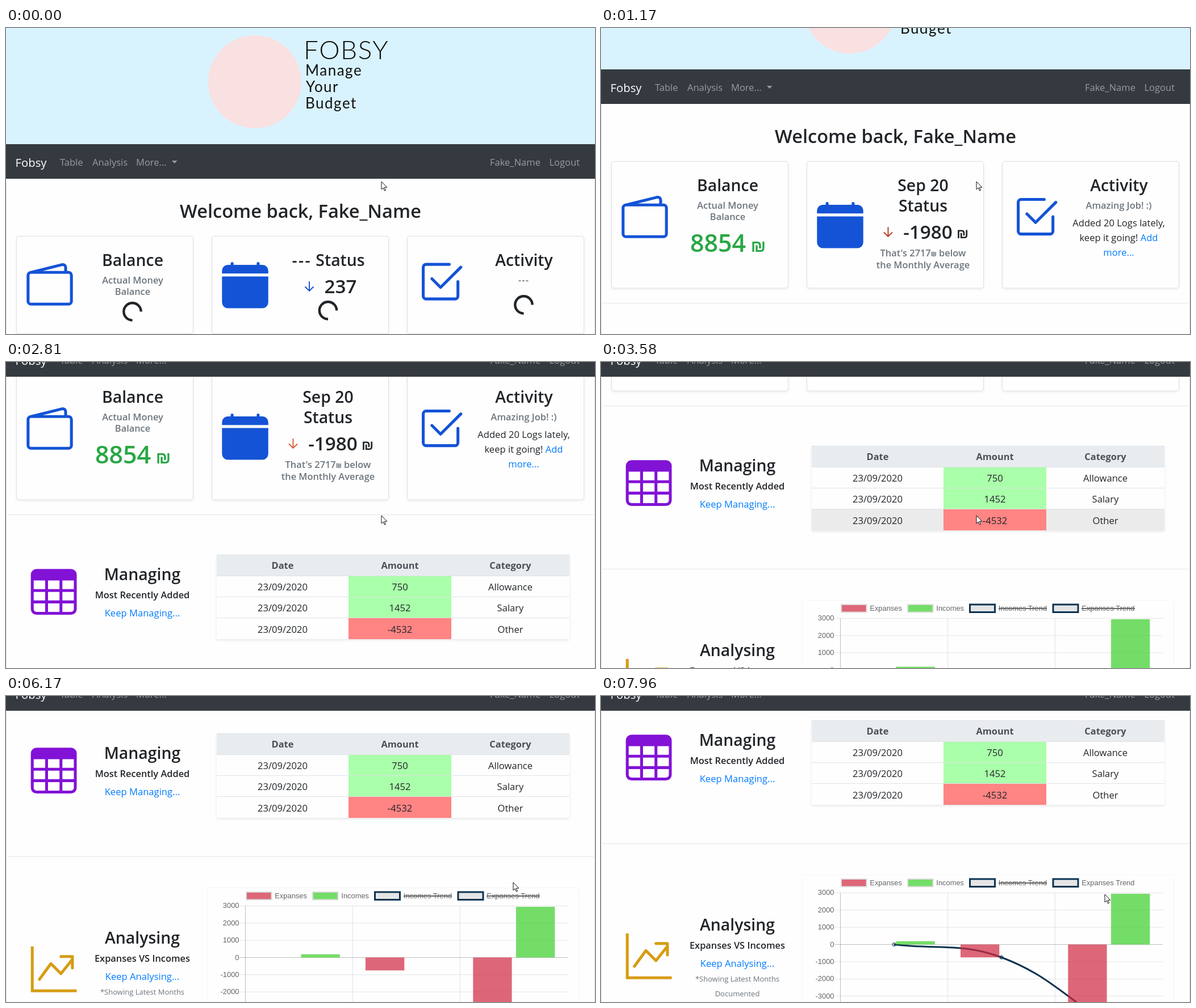
An HTML page for the animation above (8 s loop, 1037x540 px).

```html
<!DOCTYPE html>
<html lang="en">
<head>
<meta charset="utf-8">
<title>Budget dashboard</title>
<style>
html, body { margin: 0; height: 100%; overflow: hidden; background: #fefefe }
svg { display: block; width: 100%; height: 100%; font: 16.6px "Open Sans", "Noto Sans", "DejaVu Sans", sans-serif; fill: #212529 }
.mid { text-anchor: middle }
.h1 { font-size: 32.6px; font-weight: 600 }
.h2 { font-size: 28.4px; font-weight: 600 }
.sub { font-size: 16.4px; font-weight: 600 }
.th { font-size: 16.4px; font-weight: 700; fill: #495057 }
.muted { fill: #6c757d }
.small { font-size: 13px }
.num { font-size: 33.3px; font-weight: 600 }
.money { font-size: 43px; font-weight: 600; fill: #28a745 }
.coin { font: bold 24px "Liberation Sans", "DejaVu Sans", sans-serif }
.link { fill: #007bff }
.blue { fill: #1453d6 }
.brand { font: 400 26px Lato, "Open Sans", sans-serif; letter-spacing: 1.5px; fill: #111 }
.card { fill: #fefefe; stroke: #dfdfdf; filter: drop-shadow(0 2px 2px rgba(0,0,0,.06)) }
.hr { stroke: #e5e5e5 }
.nav text { fill: #9a9da0; font-size: 16.5px }
.chart text { font: 12.9px "Liberation Sans", Arial, sans-serif; fill: #666 }
.spin { fill: none; stroke: #212529; stroke-width: 4.4 }
</style>
</head>
<body>
<svg viewBox="0 0 1037 540">
  <g id="page">
    <path d="M.5 265V1400M1036.5 265V1400" stroke="#dee2e6"/>
    <rect width="1037" height="205" fill="#d9f3fe"/>
    <circle cx="438" cy="95" r="82" fill="#f9e0e1"/>
    <g class="brand">
      <text x="524" y="55" style="font-size:46px;font-weight:300">FOBSY</text>
      <text x="527" y="84">Manage</text>
      <text x="528" y="113">Your</text>
      <text x="527" y="142">Budget</text>
    </g>
    <text class="h1 mid" x="518.5" y="335">Welcome back, Fake_Name</text>
    <g id="cards"></g>

    <path id="wallet" class="blue" d="M12.136.326A1.5 1.5 0 0 1 14 1.78V3h.5A1.5 1.5 0 0 1 16 4.5v9a1.5 1.5 0 0 1-1.5 1.5h-13A1.5 1.5 0 0 1 0 13.5v-9a1.5 1.5 0 0 1 1.432-1.499zM5.562 3H13V1.78a.5.5 0 0 0-.621-.484zM1.5 4a.5.5 0 0 0-.5.5v9a.5.5 0 0 0 .5.5h13a.5.5 0 0 0 .5-.5v-9a.5.5 0 0 0-.5-.5z" fill-rule="evenodd"/>
    <path id="calendar" class="blue" d="M3.5 0a.5.5 0 0 1 .5.5V1h8V.5a.5.5 0 0 1 1 0V1h1a2 2 0 0 1 2 2v1H0V3a2 2 0 0 1 2-2h1V.5a.5.5 0 0 1 .5-.5zM0 5h16v9a2 2 0 0 1-2 2H2a2 2 0 0 1-2-2z"/>
    <path id="check" d="M11 2H3a1 1 0 0 0-1 1v10a1 1 0 0 0 1 1h10a1 1 0 0 0 1-1V8M5 7l3 3 7-7" fill="none" stroke="#1453d6" stroke-linecap="round" stroke-linejoin="round"/>

    <g class="mid">
      <text class="h2" x="223" y="420">Balance</text>
      <text class="h2" x="912" y="420">Activity</text>
      <text class="sub muted" x="223" y="450.5">Actual Money</text>
      <text class="sub muted" x="223" y="471">Balance</text>
      <text id="amount" class="num"></text>
      <g id="loading">
        <text class="h2" x="567.5" y="420"><tspan letter-spacing="2.4">---</tspan> Status</text>
        <text class="sub muted" x="911.5" y="450.5" letter-spacing="1">---</text>
        <g id="spinners"></g>
      </g>
      <g id="loaded">
        <text class="money" x="206" y="527">8854</text>
        <text class="coin" x="277" y="527" style="font-size:30px;fill:#28a745">₪</text>
        <text class="h2" x="567" y="420">Sep 20</text>
        <text class="h2" x="567" y="456">Status</text>
        <text class="coin" x="636.5" y="503">₪</text>
        <text class="sub muted" x="567" y="535">That's 2717<tspan font-size="11">₪</tspan> below</text>
        <text class="sub muted" x="567" y="556">the Monthly Average</text>
        <text class="sub muted" x="911.5" y="450.5">Amazing Job! :)</text>
        <text x="911.5" y="482">Added 20 Logs lately,</text>
        <text x="911.5" y="508">keep it going! <tspan class="link">Add</tspan></text>
        <text class="link" x="911.5" y="534">more...</text>
      </g>
    </g>
    <path id="arrow" d="M0-8V8M-7 1 0 8 7 1" fill="none" stroke-width="1.9" stroke-linecap="round"/>

    <path class="hr" d="M2 617.5H1035M2 905.5H1035"/>
    <path transform="translate(43.7 713.3)scale(5.05)" fill="#8212d6" fill-rule="evenodd" d="M0 2a2 2 0 0 1 2-2h12a2 2 0 0 1 2 2v12a2 2 0 0 1-2 2H2a2 2 0 0 1-2-2zM1 4h4v3H1zM6 4h4v3H6zM11 4h4v3h-4zM1 8h4v3H1zM6 8h4v3H6zM11 8h4v3h-4zM1 12h4v3H2a1 1 0 0 1-1-1zM6 12h4v3H6zM11 12h4v2a1 1 0 0 1-1 1h-3z"/>
    <g class="mid">
      <text class="h2" x="240" y="733">Managing</text>
      <text class="sub" x="240" y="765">Most Recently Added</text>
      <text class="link" x="240" y="797">Keep Managing...</text>
      <g id="table"></g>
      <text class="h2" x="240" y="1059">Analysing</text>
      <text class="sub" x="240" y="1091">Expanses VS Incomes</text>
      <text class="link" x="240" y="1123">Keep Analysing...</text>
      <text class="muted small" x="240" y="1149">*Showing Latest Months</text>
      <text class="muted small" x="240" y="1175">Documented</text>
    </g>
    <g transform="translate(43.7 1064)scale(5.05)" fill="none" stroke="#d69c13">
      <path d="M.5 0V15.5H16"/>
      <path d="M3 11.5 7 6l3.5 3.5 4-5M10.5 3.5h4v4" stroke-linecap="round" stroke-linejoin="round"/>
    </g>
    <path d="M354.5 1400V960.5H1008.5V1400" fill="none" stroke="#f6f6f6"/>
    <g id="chart" class="chart"></g>
  </g>

  <g id="nav" class="nav">
    <rect y="205" width="1037" height="61" fill="#343a40"/>
    <text x="16.5" y="245" style="font-size:20.3px;fill:#fff">Fobsy</text>
    <text x="95" y="242.7">Table</text>
    <text x="152" y="242.7">Analysis</text>
    <text x="229" y="242.7">More...</text>
    <path d="M292 234h9.6l-4.8 5z" fill="#9a9da0"/>
    <text x="852" y="242.7">Fake_Name</text>
    <text x="956.5" y="242.7">Logout</text>
  </g>
  <circle id="click" cx="891" cy="331" r="13" fill="#ff0" opacity=".45"/>
  <path id="cursor" d="M0 0v14l3.2-3 2.3 5.2 2-.9-2.3-5.1h4.6z" fill="#fff" stroke="#111"/>
</svg>
<script>
const LOOP = 8000, ROW_TOP = 725.5, ROW_H = 37.2, ZERO = 1083.5, UNIT = 30.35 / 1000;
const $ = id => document.getElementById(id);
const set = (id, attrs) => { for (const k in attrs) $(id).setAttribute(k, attrs[k]); };
const show = (id, on) => set(id, { display: on ? 'inline' : 'none' });
const text = (x, y, str, cls = '') => `<text x="${x}" y="${y}" class="${cls}">${str}</text>`;
const rect = (x, y, w, h, fill, more = '') => `<rect x="${x}" y="${y}" width="${w}" height="${h}" fill="${fill}" ${more}/>`;
const valueY = v => ZERO - v * UNIT;

$('cards').innerHTML = [0, 1, 2].map(i =>
  `<rect class="card" x="${18.5 + i * 344}" y="367.5" width="311" height="172" rx="4"/>`).join('');
$('spinners').innerHTML = [[222.5, 500.5], [567, 498.5], [911.5, 488.5]].map(([x, y]) =>
  `<path class="spin" transform="translate(${x} ${y})" d="M15.2 0A15.2 15.2 0 1 0 0 15.2"/>`).join('');

function buildTable() {
  const cols = [487, 693.5, 888];
  const rows = [['750', 'Allowance'], ['1452', 'Salary'], ['-4532', 'Other']];
  let out = rect(371, 688, 621, 149, '#fefefe', 'style="filter:drop-shadow(0 2px 2px rgba(0,0,0,.09))"')
    + rect(371, 688, 621, 37.5, '#e9ecef')
    + rect(371, 0, 621, ROW_H, '#ebebeb', 'id="hover"');
  ['Date', 'Amount', 'Category'].forEach((s, i) => out += text(cols[i], 713, s, 'th'));
  rows.forEach(([amount, kind], i) => {
    const y = ROW_TOP + i * ROW_H;
    out += rect(603, y, 181, ROW_H, amount < 0 ? '#ff8484' : '#aaffaa')
      + `<path d="M371 ${Math.floor(y) + .5}H992" stroke="#dee2e6"/>`
      + ['23/09/2020', amount, kind].map((s, c) => text(cols[c], y + 25.6, s)).join('');
  });
  $('table').innerHTML = out + '<path d="M371 688.5H992" stroke="#dee2e6"/>';
}

function buildChart() {
  const red = 'rgba(208,41,64,.7)', green = 'rgba(59,208,42,.7)', navy = '#0c3350';
  let out = '';
  for (let v = 3000; v >= -4000; v -= 1000) {
    const y = valueY(v);
    out += `<path d="M411 ${y}H989" stroke="#000" stroke-opacity="${v ? .1 : .25}"/>`
      + `<text x="410.5" y="${y + 4}" text-anchor="end">${v}</text>`;
  }
  for (let i = 0; i < 3; i++)
    out += `<path d="M${421.5 + i * 189} ${valueY(3000)}V1300" stroke="#000" stroke-opacity="${i ? .1 : .25}"/>`;
  out += `<g id="trend" fill="none" stroke="${navy}"><path id="curve" stroke-width="3"/>`
    + [0, 1, 2].map(i => `<circle id="dot${i}" r="3" fill="rgba(0,0,0,.1)"/>`).join('') + '</g>';
  const bar = (x, v, fill) => rect(x, Math.min(ZERO, valueY(v)), 68.3, Math.abs(v) * UNIT, fill);
  out += bar(519.5, 190, green) + bar(633, -750, red) + bar(822.3, -4650, red) + bar(898, 2950, green);
  const legend = [['Expanses', 423, red], ['Incomes', 540, green], ['Incomes Trend', 649.5], ['Expanses Trend', 796]];
  for (const [name, x, fill] of legend) {
    out += fill ? rect(x, 968, 44.5, 13.5, fill, 'stroke="#ddd" stroke-width="2"')
      : rect(x, 968, 44, 13.5, '#e5e5e5', `stroke="${navy}" stroke-width="3"`);
    out += text(x + 50.3, 979, name);
  }
  $('chart').innerHTML = out + '<g stroke="#666" stroke-width="1.8"><path d="M700 975H785"/><path id="strike" d="M846 975H940"/></g>';
}

// Progress 0..1 in n equal jumps, the first at a and the last at b.
const steps = (t, a, b, n) => t < a ? 0 : Math.min(n, Math.floor((t - a) / ((b - a) / (n - 1) || 1) + 1.001)) / n;
const easeInOut = p => p < .5 ? 2 * p * p : 1 - 2 * (1 - p) ** 2;
const easeOut = p => 1 - (1 - p) ** 4;

// start, end, jumps, distance
const scrolls = [[460, 690, 4, 108], [1170, 1320, 3, 108], [1790, 2030, 4, 108],
  [2810, 2980, 3, 108], [3340, 3580, 4, 108], [6100, 6240, 3, 105]];
// start, end, jumps, x, y
const moves = [[4670, 4670, 1, 662, 262], [4750, 4980, 4, 690, 192], [5060, 5450, 6, 868, 276],
  [5540, 6010, 7, 893, 329], [6470, 6560, 2, 891, 331], [7340, 7960, 9, 887, 350]];

// The scroll runs slightly ahead of its jumps and lands on whole pixels.
const scrollAt = t => Math.round(scrolls.reduce((y, [a, b, n, d]) =>
  y + d * easeInOut(Math.min(1, 1.008 * steps(t, a, b, n))), 0));
const cursorAt = t => moves.reduce(([x, y], [a, b, n, tx, ty]) => {
  const p = steps(t, a, b, n);
  return [x + (tx - x) * p, y + (ty - y) * p];
}, [661, 271]);

function drawTrend(p) {
  const pts = [0, -750, -4650].map((v, i) => [516 + i * 189, valueY(v * p)]);
  const [a, b, c] = pts;
  const toward = (q, from, to, k) => [0, 1].map(i => q[i] + k * (to[i] - from[i]));
  const ab = Math.hypot(b[0] - a[0], b[1] - a[1]), bc = Math.hypot(c[0] - b[0], c[1] - b[1]);
  const k = .4 / (ab + bc);
  set('curve', { d: `M${a}C${toward(a, a, b, .4)} ${toward(b, a, c, -k * ab)} ${b}`
    + `C${toward(b, a, c, k * bc)} ${toward(c, b, c, -.4)} ${c}` });
  pts.forEach(([x, y], i) => set('dot' + i, { cx: x, cy: y }));
}

function draw(t) {
  const scroll = scrollAt(t), [cx, cy] = cursorAt(t), ready = t >= 90;
  set('page', { transform: `translate(0 ${-scroll})` });
  set('nav', { transform: `translate(0 ${-Math.min(scroll, 240)})` });
  set('cursor', { transform: `translate(${cx} ${cy})` });
  show('click', t >= 7080 && t < 7270);

  show('loading', !ready);
  show('loaded', ready);
  for (const card of $('cards').children) card.setAttribute('height', ready ? 223.5 : 172);
  const icon = (id, x, y, drop) => set(id, { transform: `translate(${x} ${y + ready * drop})scale(5.09)` });
  icon('wallet', 36.3, 413.5, 13);
  icon('calendar', 380.3, 413, 26);
  icon('check', 724.4, 406.9, 17.5);
  set('amount', { x: ready ? 575.5 : 589, y: ready ? 504 : 468 });
  $('amount').textContent = Math.round(237 - 2217 * steps(t, 90, 230, 3));
  set('arrow', {
    transform: ready ? 'translate(505.5 492)' : 'translate(534 456)',
    stroke: !ready ? '#1453d6' : t < 1790 ? '#b5391f' : t < 2810 ? '#dc7a3e' : '#d65a36'
  });

  const row = Math.floor((cy + scroll - ROW_TOP) / ROW_H);
  show('hover', row >= 0 && row < 3);
  set('hover', { y: ROW_TOP + row * ROW_H });

  const grow = steps(t, 7270, 7960, 10);
  show('trend', grow > 0);
  show('strike', !grow);
  drawTrend(easeOut(grow));
}

buildTable();
buildChart();
const start = performance.now();
(function tick() {
  draw((performance.now() - start) % LOOP);
  requestAnimationFrame(tick);
})();
</script>
</body>
</html>
```
